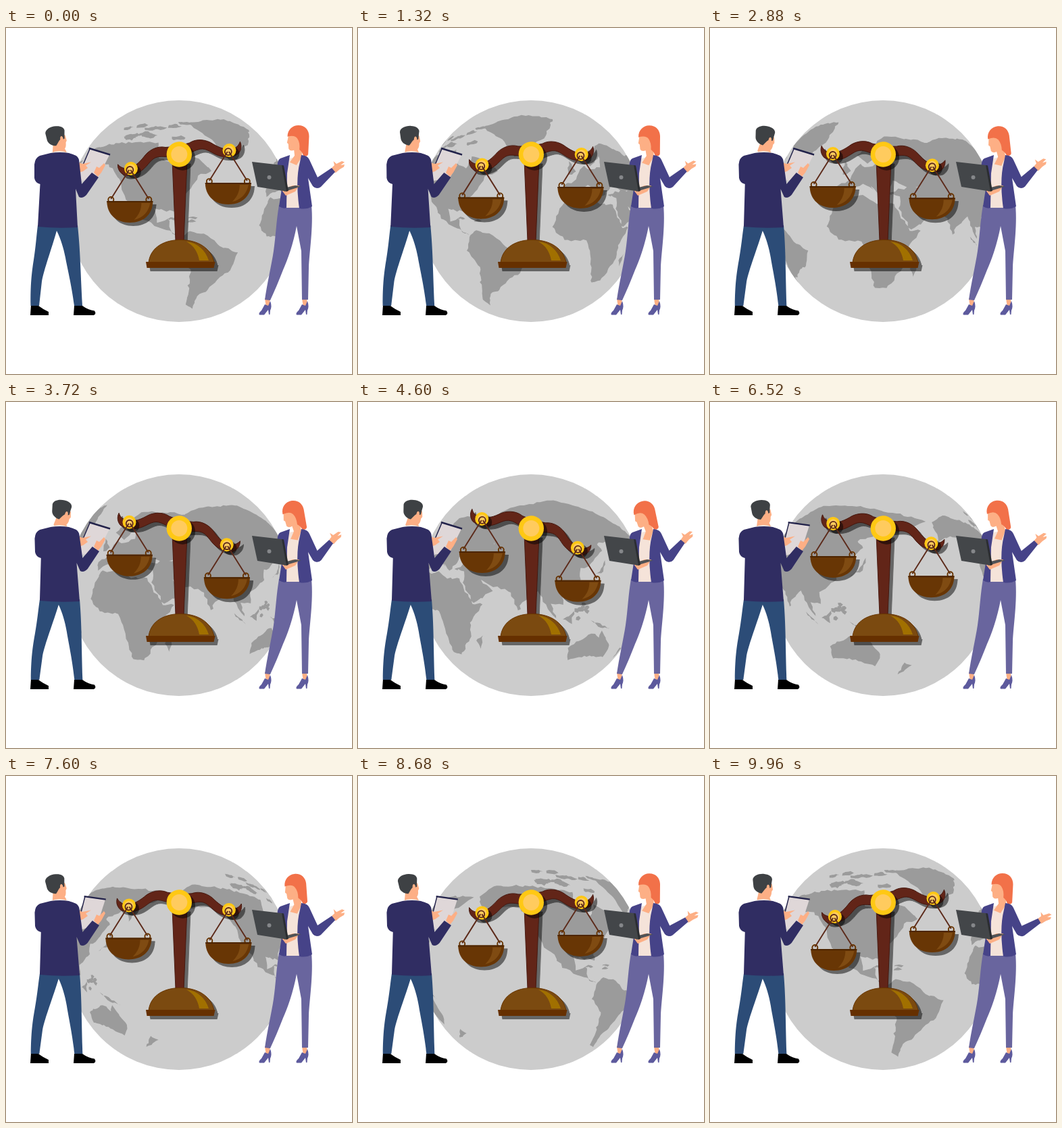
Recreate the animation shown at these times as an HTML page. Size 512 by 512 pixels, loop 10000 ms.

```html
<!DOCTYPE html>
<html lang="en">
<head>
<meta charset="utf-8">
<title>Scales and globe</title>
<style>
html, body { margin: 0; width: 100%; height: 100%; overflow: hidden; background: #fff; }
svg { display: block; width: 100vw; height: 100vh; }
.shade { filter: drop-shadow(5px 5px 0 rgba(0, 0, 0, .5)); }
.skin { fill: #fdaf85; }
.wood { fill: #622518; stroke: #43160d; stroke-width: .9; }
</style>
</head>
<body>
<svg viewBox="0 0 512 512">
  <defs>
    <clipPath id="disc"><circle cx="256" cy="271" r="164"/></clipPath>
    <path id="arm" class="wood" d="M0-12L18-14C30-19 44-14 52-6C60 1 72 9 82 6C88 4 90 1 92-2C94 6 90 12 86 15C78 19 66 17 58 13C48 8 42-2 32-2C26-2 18 0 0 6Z"/>
    <g id="hub">
      <circle r="10" fill="#ffc814"/>
      <circle r="6.500" fill="#ffcb5e"/>
    </g>
    <g id="strings" fill="none" stroke="#5c2a1a" stroke-width="1.900">
      <circle cy="2" r="5"/>
      <path d="M-1 2L-28 45M1 2L28 45"/>
      <g stroke="#663300"><circle cx="-28" cy="46" r="4"/><circle cx="28" cy="46" r="4"/></g>
    </g>
    <g id="bowl">
      <path d="M-34 48H34C34 68 20 80 0 80S-34 68-34 48Z" fill="#683605"/>
      <path d="M17 51H30C28 63 20 73 6 76C14 68 17 60 17 51Z" fill="#7f4b12"/>
      <path d="M-34 49H34" stroke="#4d2500" stroke-width="2"/>
    </g>
    <g id="heel">
      <path class="skin" d="M383 400H390L391 410L385 414Z"/>
      <path d="M383 409L388 411L391 404Q394 412 391 418L390.500 424H389L388 417L382 424.500H375Q373 422 378 418Z" fill="#5d5a9d"/>
    </g>
  </defs>

  <circle cx="256" cy="271" r="164" fill="#ccc"/>
  <path id="land" clip-path="url(#disc)" fill="#9b9b9b"/>

  <g class="shade"><path class="wood" d="M246 196H268L263 316H251Z"/></g>
  <g class="shade">
    <path d="M211 347C214 323 236 313.500 258 313.500C284 313.500 304 326 308 347Z" fill="#7b4a10" stroke="#663300"/>
    <path d="M267 316C284 318 295 329 300 344H286C284 332 278 322 267 316Z" fill="#a17000"/>
    <path d="M207 346H309.500L307.500 355H208.500Z" fill="#663000"/>
  </g>
  <g class="shade"><g id="beam"><use href="#arm"/><use href="#arm" transform="scale(-1 1)"/></g></g>
  <g class="shade">
    <circle cx="256.300" cy="187" r="18.700" fill="#ffc814"/>
    <circle cx="256.300" cy="187" r="12" fill="#ffcb5e"/>
  </g>
  <g class="shade"><use class="left" href="#hub"/><use class="right" href="#hub"/></g>
  <g><use class="left" href="#strings"/><use class="right" href="#strings"/></g>
  <g class="shade"><use class="left" href="#bowl"/><use class="right" href="#bowl"/></g>

  <g>
    <path d="M37 410L48 411Q56 417 63 420V425H36Z"/>
    <path d="M101 411H113Q121 417 131 418.500Q134 423 130 425H100Z"/>
    <path id="legs" fill="#2c4c77" d="M47 292H106C110 330 110 355 113 411H101C97 380 90 352 88 340C85 325 81 312 75 300C68 325 56 358 53 375L49 411H36.500C36 380 38 362 41 343C44 324 45 308 47 292Z"/>
    <g id="board">
      <path d="M124 179L153 188L136 222L112 226L108 214Z" fill="#dfd7d8"/>
      <path d="M109 214L124 179" fill="none" stroke="#22224a" stroke-width="1.500"/>
      <path d="M123 178L154 187.500" stroke="#22224a" stroke-width="2.400"/>
    </g>
    <path class="skin" d="M107 199L113 201L126 198.500L118 203.500L121 207L114 212L108 214Z"/>
    <path class="skin" d="M130 214L134 205L138 207L145 200L147 203L141 214L136 220Z"/>
    <g id="manHead">
      <path class="skin" d="M71 168L69 184Q79 190 90 184L87.500 179Q90 176 89.500 170L91 167L89 159L80 155Z"/>
      <path d="M60 155C60 149 68 145 76 145C84 145 88 148 88.500 152Q88 158 88 164L86 165C86 159 81 158 81.500 165C79 167 78 170 75 174C69 174 63 170 62 165Z" fill="#3e4144"/>
    </g>
    <path d="M66 185Q79 179 92 185L91 188H67Z" fill="#eee7e4"/>
    <path id="coat" d="M66 185Q80 183 93 185C101 188 106 188 108 195L112 231L127 214L137 221L119 247Q113 253 108 250L103 238L106 295Q76 297 47 294L50.500 231Q43 229 42 222V202Q43 192 50 189Z" fill="#302d62"/>
  </g>

  <g>
    <use href="#heel"/><use href="#heel" x="55"/>
    <path d="M404 262H452C455 295 449 330 448 355L447 402H438L437 330L430 293C425 320 417 342 410 358C403 376 397 390 391 403L383 402C386 380 393 350 396 330C399 310 400 285 404 262Z" fill="#69659e"/>
    <path d="M417 194L437 188L437 266H413Z" fill="#f5e3d9"/>
    <g id="womanHead">
      <path class="skin" d="M418 157L415.500 170L417.500 172L418 179Q420 183 426 181L427 189L420 199L430 203L438 190L437 170L434 158Z"/>
      <path d="M416 161C416 150 424 144 432 144C442 144 448 151 448 160L447 187Q445 191 440 189Q438 183 434 180Q435 170 431 164Q427 158 416 161Z" fill="#f27149"/>
    </g>
    <g fill="#464388">
      <path d="M420 188L406 193Q400 196 402 212L408 238L404 264Q411 268 415 266L416 215Z"/>
      <path d="M437 188Q447 189 449 195L461 221L464 234Q459 239 454 234L447 222L453 264Q445 269 434 267Q428 225 435 198Z"/>
    </g>
    <g id="forearm">
      <path class="skin" d="M484 213L482 207L486 203L484.500 197L489 201L497 197L501 198.500L495 203L501 202L500 205.500L494 209L488 214Z"/>
      <path d="M458 223L482 207L487 213L466 235Q461 239 456 235Z" fill="#464388"/>
    </g>
    <path class="skin" d="M408 240L424 233L434 233L428 242L414 248Z"/>
    <path d="M412 242L411 237L428 233L437 234.500Z" fill="#505357"/>
    <path d="M364 198L408 203L416 242L372 235Z" fill="#434649"/>
    <path d="M408 203L411 203.500L418 241L415 242Z" fill="#2b2d30"/>
    <circle cx="389.500" cy="221" r="3" fill="#85878a"/>
  </g>
</svg>
<script>
const LOOP = 10000, STEP = 40, TAU = 2 * Math.PI;
const R = 164, CX = 256, CY = 271, DEG = 77;
const $ = id => document.getElementById(id);
const move = (el, value) => el.setAttribute('transform', value);

let seed = 7;
function random() {
  seed = seed * 16807 % 2147483647;
  return seed / 2147483647;
}
const between = (a, b) => a + (b - a) * random();

// Key headlands as longitude,latitude; the coast between them is roughened.
const americas = [
  '-167,66 -156,71 -128,70 -95,68 -94,59 -82,55 -78,62 -65,59 -56,52 -66,49 -70,43 -81,31 -80,25 -97,28 -95,18 -87,21 -84,10 -78,8 -92,14 -105,20 -113,31 -118,34 -124,48 -135,58 -152,59 -163,55 -165,61',
  '-77,8 -72,12 -62,10 -50,0 -35,-6 -40,-21 -48,-26 -57,-37 -65,-42 -68,-55 -74,-50 -71,-18 -81,-5',
  '-73,78 -54,70 -44,60 -22,70 -14,81 -40,83'
];
const west = [
  '-9,37 -9,43 -1,46 8,56 11,54 22,56 22,63 13,56 5,61 25,71 60,69 60,42 41,42 31,46 28,41 22,37 14,45 18,40 10,44',
  '-6,36 10,37 20,31 32,31 43,12 51,12 40,-3 40,-15 27,-34 18,-34 13,-8 9,4 -8,5 -17,15 -10,30',
  '50,-13 47,-25 44,-18', '-5,50 1,52 -4,58'
];
const east = [
  '59,69 73,73 104,77 140,73 188,66 163,58 157,51 155,59 137,54 141,50 128,39 122,38 122,30 108,21 109,12 100,13 104,2 98,9 91,22 80,14 77,8 72,21 57,26 50,30 59,22 44,13 35,28 36,36 27,38 41,42 59,43',
  '114,-23 130,-13 136,-13 140,-17 142,-11 153,-27 149,-38 136,-34 129,-32 115,-34',
  '131,32 141,36 143,44 139,38', '109,1 117,7 116,-3', '95,5 106,-5 100,-1',
  '131,-1 150,-10 138,-7', '172,-35 178,-38 167,-46'
];
const parse = text => text.split(' ').map(p => p.split(',').map(Number));

function islands(count, [lon0, lon1], [lat0, lat1], w, h) {
  return Array.from({ length: count }, () => {
    const lon = between(lon0, lon1), lat = between(lat0, lat1);
    return Array.from({ length: 5 }, (_, k) => {
      const a = TAU * k / 5, r = between(.6, 1.2);
      return [lon + w * r * Math.cos(a), lat + h * r * Math.sin(a)];
    });
  });
}

// Flat map position, in globe radii.
function flat([lon, lat]) {
  const m = 1.25 * Math.log(Math.tan(Math.PI / 4 + lat * Math.PI / 450));
  return [lon / DEG, .33 - .95 * m * 360 / TAU / DEG];
}
function coast(corners) {
  const pts = corners.map(flat);
  return pts.flatMap(([x, y], i) => {
    const [u, v] = pts[(i + 1) % pts.length];
    const n = Math.ceil(Math.hypot(u - x, v - y) / .04);
    return Array.from({ length: n }, (_, k) => {
      const rough = k ? .012 : 0;
      return [x + (u - x) * k / n + between(-rough, rough), y + (v - y) * k / n + between(-rough, rough)];
    });
  });
}
const lands = [
  ...[...americas, ...west, ...east].map(parse),
  ...islands(14, [-122, -70], [69, 79], 6, 1.2),
  ...islands(3, [-84, -69], [18, 22], 4, 1),
  ...islands(9, [118, 128], [-8, 15], 2, 2)
].map(coast);

// Bulge a flat point onto the globe; far points land outside the rim.
function bulge(x, y) {
  const s = Math.hypot(x, y) || 1e-6;
  const r = s < Math.PI / 2 ? Math.sin(s) : s - Math.PI / 2 + 1;
  return (CX + R * r * x / s).toFixed(1) + ' ' + (CY + R * r * y / s).toFixed(1);
}
function drawGlobe(p) {
  let d = '';
  for (const shape of lands) for (const turn of [-360, 0, 360]) {
    const off = (turn + 79.5 - 360 * p) / DEG;
    if (shape.some(([x]) => Math.abs(x + off) < 1.6))
      d += 'M' + shape.map(([x, y]) => bulge(x + off, y)).join('L') + 'Z';
  }
  $('land').setAttribute('d', d);
}

function drawScales(p) {
  const tilt = 3.4 - 13.9 * Math.cos(TAU * p);
  const a = tilt * TAU / 360, c = Math.cos(a), s = Math.sin(a);
  move($('beam'), `translate(256.3 187) rotate(${tilt})`);
  for (const [side, x] of [['left', -74], ['right', 74]]) {
    const hx = 256.3 + x * c - 7.7 * s, hy = 187 + x * s + 7.7 * c;
    for (const el of document.querySelectorAll('.' + side)) {
      const swing = el.getAttribute('href') === '#hub' ? 0 : tilt * .08 - .8;
      move(el, `translate(${hx + swing} ${hy})`);
    }
  }
}

function ease(x) {
  const k = Math.min(Math.max(x, 0), 1);
  return k * k * (3 - 2 * k);
}
const turn = (id, angle, x, y) => move($(id), `rotate(${angle} ${x} ${y})`);
const lean = (id, c, y) => move($(id), `matrix(1 0 ${c} 1 ${-c * y} 0)`);

function drawPeople(p) {
  const wave = Math.cos(TAU * p), hem = 3 * ease(p / .3);
  lean('coat', hem / 110, 185);
  lean('legs', -hem / 132, 425);
  turn('manHead', 5.4 + 9 * Math.cos(TAU * (p - .37) / .83), 79, 188);
  turn('board', -9 * ease((p - .47) / .17), 120, 225);
  turn('womanHead', 7.5 * wave - 6.7, 438, 195);
  turn('forearm', 9 * p + 7 * wave - 7, 460, 231);
}

const start = performance.now();
function tick() {
  const t = (performance.now() - start) % LOOP;
  const p = Math.floor(t / STEP) * STEP / LOOP;
  drawGlobe(p);
  drawScales(p);
  drawPeople(p);
  requestAnimationFrame(tick);
}
tick();
</script>
</body>
</html>
```
